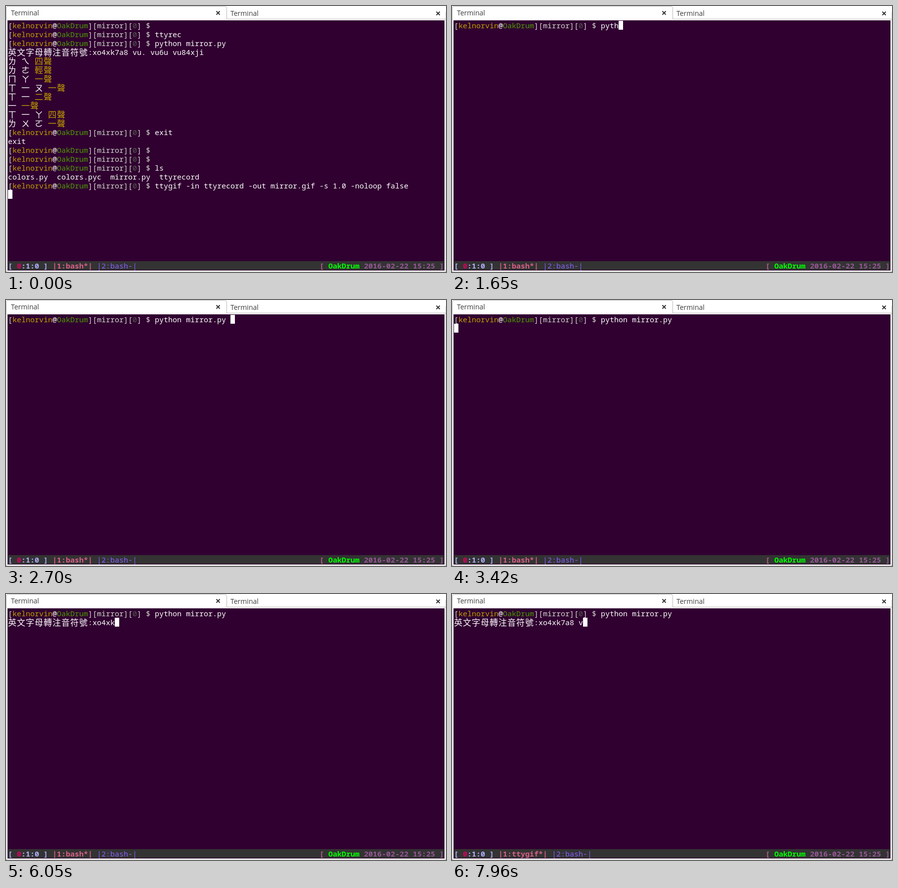
Write an HTML page that moves like this. It is 890 px wide and 538 px high and loops after 8000 ms.

```html
<!DOCTYPE html>
<html lang="zh-Hant">
<head>
<meta charset="utf-8">
<title>Terminal</title>
<style>
html, body { margin: 0; width: 100%; height: 100%; overflow: hidden; background: #fff; }
#stage { position: relative; width: 890px; height: 538px; overflow: hidden; background: #fff; }
svg { position: absolute; left: 0; top: 0; }
svg text { font: 14px "Open Sans", "Noto Sans", sans-serif; fill: #3c3c3c; }
#term { position: absolute; left: 3px; top: 29px; width: 884px; height: 506px; background: #300030; }
#screen, #status {
  position: absolute; left: 1px; width: 882px;
  font: 500 15px/18px "Noto Sans Mono", "DejaVu Sans Mono", monospace;
  font-variant-ligatures: none; color: #fff;
}
#screen { top: 1px; }
#status { top: 487px; background: #333; }
.row { position: relative; height: 18px; white-space: pre; }
.cjk {
  position: relative; top: 1px; letter-spacing: 1px;
  font: 500 17px/0 "Noto Sans CJK TC", "Noto Sans CJK JP", "Noto Sans CJK SC", "Noto Sans CJK", sans-serif;
}
.cur { display: inline-block; width: 9px; height: 18px; vertical-align: top; background: #fff; }
.fg { color: #d3d7cf; }
.yel { color: #c4a000; }
.grn { color: #4e9a06; }
.dim { color: #555753; }
.lil { color: #afafff; }
.red { color: #d7005f; }
.act { color: #d75f87; }
.vio { color: #875fff; }
.host { color: #0f0; }
.brk { color: #af5f87; }
.date { color: #af5faf; opacity: .8; }
.right { position: absolute; right: 0; top: 0; }
</style>
</head>
<body>
<div id="stage">
  <svg width="890" height="538" fill="none" stroke="#b9b6b3">
    <path d="M.5 538V5.5Q.5 .5 5.5 .5H441.5Q446.5 .5 446.5 5.5V26.5H889.5V537.5H.5"/>
    <path d="M889.5 27V12" stroke="#d6d4d2"/>
    <path d="M425.5 10.5l7 7m0-7l-7 7M870.5 11.5l7 7m0-7l-7 7" stroke="#333" stroke-width="2"/>
    <g stroke="none">
      <text x="10" y="19">Terminal</text>
      <text x="454" y="20">Terminal</text>
    </g>
  </svg>
  <div id="term">
    <div id="screen"></div>
    <div id="status"></div>
  </div>
</div>
<script>
const LOOP = 8000;
const span = (cls, text) => `<span class="${cls}">${text}</span>`;
const row = html => `<div class="row">${html}</div>`;
const cursor = span('cur', '');

const user = 'kelnorvin', host = 'OakDrum';
const prompt = span('fg', '[') + span('yel', user) + '@' + span('grn', host) +
  span('fg', '][mirror][') + span('dim', '0') + span('fg', '] $ ');
const ask = span('cjk', '英文字母轉注音符號') + ':';
const run = 'python mirror.py';
const keys = 'xo4xk7a8 vu. vu6u vu84xji';

// Symbols sit on a grid of two cells plus a space.
const sounds = (symbols, tone) =>
  [...symbols].map(s => span('cjk', s) + ' ').join('') + span('cjk yel', tone + '聲');

const history = [
  prompt,
  prompt + 'ttyrec',
  prompt + run,
  ask + keys,
  sounds('ㄌㄟ', '四'),
  sounds('ㄌㄜ', '輕'),
  sounds('ㄇㄚ', '一'),
  sounds('ㄒ一ㄡ', '一'),
  sounds('ㄒ一', '二'),
  sounds('一', '一'),
  sounds('ㄒ一ㄚ', '四'),
  sounds('ㄌㄨㄛ', '一'),
  prompt + 'exit',
  'exit',
  prompt,
  prompt,
  prompt + 'ls',
  'colors.py  colors.pyc  mirror.py  ttyrecord',
  prompt + 'ttygif -in ttyrecord -out mirror.gif -s 1.0 -noloop false',
  ''
];

const command = n => [prompt + (run + ' ').slice(0, n)];
const answer = n => [prompt + run, ask + keys.slice(0, n)];

const steps = [
  [0, history],
  [970, command(0)],
  [1200, command(1)],
  [1350, command(3)],
  [1650, command(4)],
  [1840, command(5)],
  [2070, command(7)],
  [2510, command(8)],
  [2700, command(17)],
  [3420, [prompt + run, '']],
  [4730, answer(1)],
  [5310, answer(2)],
  [5740, answer(3)],
  [6050, answer(5)],
  [6710, answer(6)],
  [6980, answer(7)],
  [7290, answer(9)],
  [7960, answer(10)]
];
const RENAME = 6710;

const statusLine = job => row(
  '<b>' + span('lil', '[ ') + span('red', '0') + span('lil', ':1:0 ] ') +
  span('act', `|1:${job}*|`) + '</b> ' + span('vio', '|2:bash-|') +
  '<b class="right">' + span('brk', '[ ') + span('host', host) +
  span('date', ' 2016-02-22 15:25 ]') + '</b>');

const screenEl = document.getElementById('screen');
const statusEl = document.getElementById('status');
let shown = -1;

function draw() {
  const t = performance.now() % LOOP;
  const i = steps.findLastIndex(([start]) => start <= t);
  if (i !== shown) {
    shown = i;
    const [start, lines] = steps[i];
    screenEl.innerHTML = lines.map((line, k) =>
      row(k === lines.length - 1 ? line + cursor : line)).join('');
    statusEl.innerHTML = statusLine(start < RENAME ? 'bash' : 'ttygif');
  }
  requestAnimationFrame(draw);
}
draw();
</script>
</body>
</html>
```
